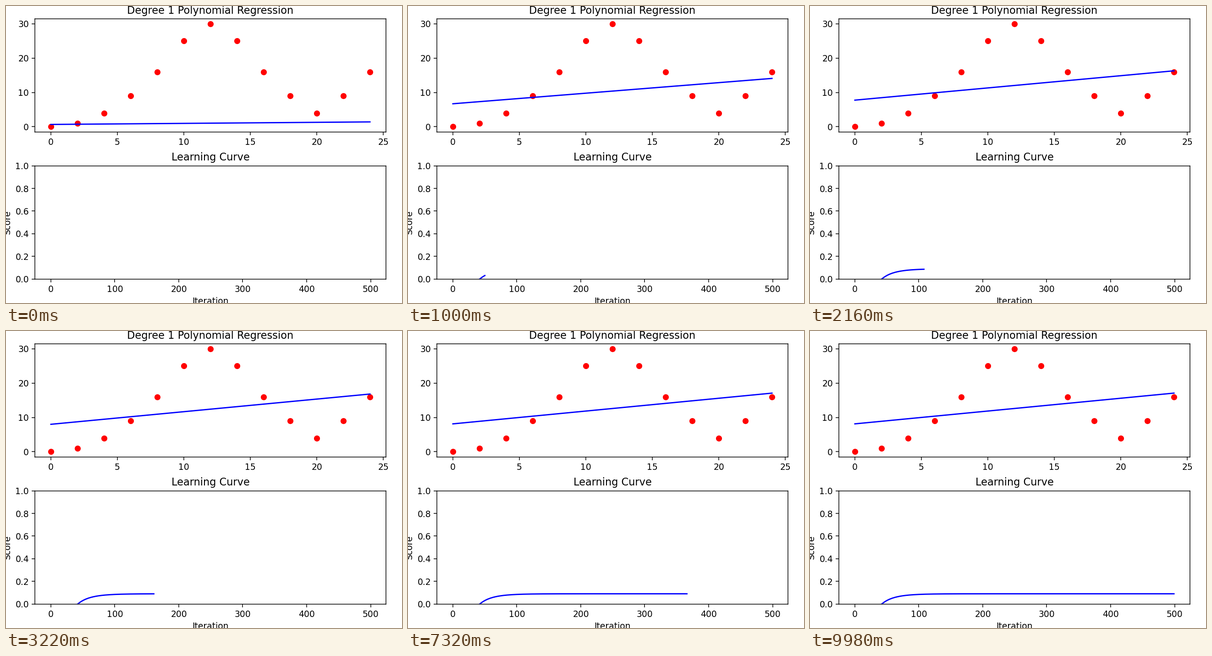
A matplotlib script that plays this animation: 864 by 648 pixels, repeating every 10000 ms.

```python
import numpy as np
import matplotlib.pyplot as plt
from matplotlib.animation import FuncAnimation

EPOCHS = 500
INTERVAL = 20

# Samples and their least-squares line
x = np.arange(0, 25, 2)
y = np.array([0, 1, 4, 9, 16, 25, 30, 25, 16, 9, 4, 9, 16])
slope, intercept = np.polyfit(x, y, 1)
best_fit = intercept + slope * x

# Stochastic gradient descent from zero weights on standardised data:
# one step per sample, with the learning rate falling as t ** -0.25.
t = np.arange(1, EPOCHS * len(x) + 1)
remaining = np.cumprod(1 - 0.01 * t ** -0.25)[len(x) - 1::len(x)]
fits = np.outer(1 - remaining, best_fit)

total = np.sum((y - y.mean()) ** 2)
scores = 1 - np.sum((y - fits) ** 2, axis=1) / total
epochs = np.arange(EPOCHS)

fig, (fit_ax, score_ax) = plt.subplots(2, 1, figsize=(6.4, 4.8), dpi=135)
fig.tight_layout()
fig.subplots_adjust(hspace=0.3)

fit_ax.plot(x, y, "ro")
fit_line, = fit_ax.plot(x, fits[0], "b-")
fit_ax.set_xlim(-1.2, 25.2)
fit_ax.set_ylim(-1.5, 31.5)
fit_ax.set_xticks(range(0, 26, 5))
fit_ax.set_yticks(range(0, 31, 10))
fit_ax.set_title("Degree 1 Polynomial Regression", y=1.0)

score_line, = score_ax.plot([], [], "b-")
margin = 0.05 * (EPOCHS - 1)
score_ax.set_xlim(-margin, EPOCHS - 1 + margin)
score_ax.set_ylim(0, 1)
score_ax.set_xticks(range(0, 501, 100))
score_ax.set_title("Learning Curve", y=1.0)
score_ax.set_xlabel("Iteration")
score_ax.set_ylabel("Score")


def update(epoch):
    fit_line.set_ydata(fits[epoch])
    score_line.set_data(epochs[:epoch + 1], scores[:epoch + 1])
    return fit_line, score_line


anim = FuncAnimation(fig, update, frames=EPOCHS, interval=INTERVAL,
                     init_func=lambda: update(0), repeat=True,
                     repeat_delay=0, blit=False)
plt.show()
```
